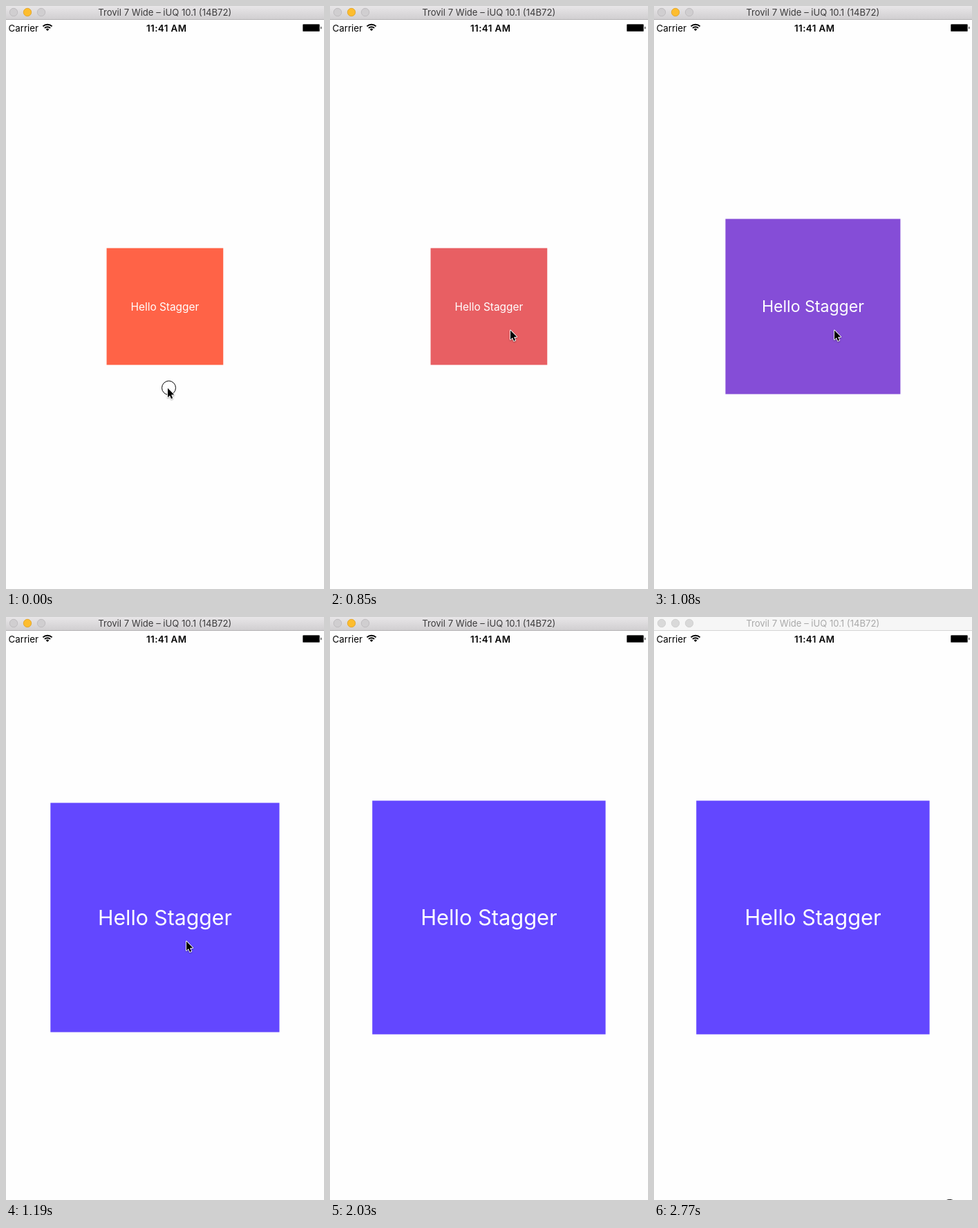
These frames come from a looping animation (460 px wide and 842 px high, 2.87 s). An HTML page with a canvas:

```html
<!DOCTYPE html>
<html lang="en">
<head>
<meta charset="utf-8">
<title>Hello Stagger</title>
<style>
  html, body { margin: 0; width: 100%; height: 100%; overflow: hidden; background: #fefefe; }
  canvas { display: block; width: 460px; height: 842px; }
</style>
</head>
<body>
<canvas id="stage"></canvas>
<script>
const W = 460, H = 842, LOOP = 2870;
const canvas = document.getElementById('stage');
const ctx = canvas.getContext('2d');
const dpr = window.devicePixelRatio || 1;
canvas.width = W * dpr;
canvas.height = H * dpr;

const FONT = 'Inter, "Open Sans", sans-serif';
const FROM = [255, 99, 71], TO = [99, 71, 255];
const START = [233.5, 551], REST = [260.5, 467.5], EXIT = [409.5, 819];

// The pointer rises past its resting place and settles back
const RISE = [[235, 547], [243, 525], [252, 495], [258, 471], [261, 460], [262, 457.5], [261.5, 462], REST];
// Eased growth of the box, one value per tick
const GROW = [0, 0.004, 0.041, 0.235, 0.5, 0.78, 0.963, 1];
const ARROW = [[0.5, 1], [0.5, 14.2], [3.5, 11.4], [5.5, 16.2], [7.6, 15.3], [5.6, 10.6], [9.7, 10.3]];

const mix = (a, b, p) => a + (b - a) * p;
const clamp = p => Math.min(1, Math.max(0, p));

// Index of the current tick among n evenly spaced between a and b; -1 before a
function tick(t, a, b, n) {
  if (t < a) return -1;
  return Math.min(n - 1, Math.floor((t - a) * (n - 1) / (b - a) + 0.13));
}

function disc(x, y, r, fill, line) {
  ctx.beginPath();
  ctx.arc(x, y, r, 0, Math.PI * 2);
  ctx.fillStyle = fill;
  ctx.fill();
  ctx.strokeStyle = line;
  ctx.lineWidth = 0.8;
  ctx.stroke();
}

function label(str, x, y, size, color, align = 'center', weight = 400, spacing = 0) {
  ctx.font = `${weight} ${size}px ${FONT}`;
  ctx.letterSpacing = `${spacing}px`;
  ctx.textAlign = align;
  ctx.fillStyle = color;
  ctx.fillText(str, x, y);
}

function titleBar(active) {
  const g = ctx.createLinearGradient(0, 0, 0, 19);
  g.addColorStop(0, active ? '#e8e6e8' : '#f6f6f6');
  g.addColorStop(1, active ? '#d1cfd1' : '#f6f6f6');
  ctx.fillStyle = g;
  ctx.fillRect(0, 0, W, 19);
  ctx.fillStyle = active ? '#b4b2b4' : '#d4d4d4';
  ctx.fillRect(0, 19, W, 1);
  const off = active ? ['#d0ced0', '#b9b7b9'] : ['#d9d9d9', '#cbcbcb'];
  disc(11, 9, 5.7, ...off);
  disc(31, 9, 5.7, ...(active ? ['#fdbd2e', '#dfa023'] : off));
  disc(51, 9, 5.7, ...off);
  label('Trovil 7 Wide – iUQ 10.1 (14B72)', 229.7, 14, 13.1, active ? '#3c3b3c' : '#a9a9a9');
}

function statusBar() {
  label('Carrier', 3.5, 36.5, 13.3, '#000', 'left');
  label('11:41 AM', 232.2, 36.5, 13.3, '#000', 'center', 600, 0.45);

  ctx.strokeStyle = '#000';
  ctx.lineWidth = 1.9;
  for (const r of [9.3, 5.8]) {
    ctx.beginPath();
    ctx.arc(60, 36, r, -Math.PI * 0.75, -Math.PI * 0.25);
    ctx.stroke();
  }
  ctx.fillStyle = '#000';
  ctx.beginPath();
  ctx.moveTo(60, 36);
  ctx.arc(60, 36, 3.2, -Math.PI * 0.75, -Math.PI * 0.25);
  ctx.fill();

  // Battery: soft rim around a full charge
  ctx.fillStyle = '#555';
  ctx.beginPath();
  ctx.roundRect(429, 26, 25, 11, 1.5);
  ctx.roundRect(455, 29.7, 1.5, 3.6, 0.7);
  ctx.fill();
  ctx.fillStyle = '#000';
  ctx.fillRect(430, 27, 23, 9);
}

function box(t) {
  const k = tick(t, 850, 1250, 8);
  const scale = 1 + (k < 0 ? 0 : GROW[k]);
  const shown = 850 + k * 400 / 7;
  const hue = k < 0 ? 0 : clamp((shown - 796) / 360);
  const rgb = FROM.map((v, i) => Math.round(mix(v, TO[i], hue)));
  ctx.save();
  ctx.translate(229.9, 434);
  ctx.scale(scale, scale);
  ctx.fillStyle = `rgb(${rgb})`;
  ctx.fillRect(-84.35, -84.35, 168.7, 168.7);
  label('Hello Stagger', 0, 5.6, 15.4, '#fff');
  ctx.restore();
}

function pointerAt(t) {
  if (t >= 2030) return null;
  if (t >= 1970) return [410.3, 832];
  const out = tick(t, 1430, 1910, 9);
  if (out >= 0) {
    const p = ((out + 1) / 9) ** 1.5;
    return REST.map((v, i) => mix(v, EXIT[i], p));
  }
  const rise = tick(t, 200, 610, 8);
  return rise < 0 ? START : RISE[rise];
}

function pointer([x, y]) {
  ctx.save();
  ctx.translate(x, y);
  ctx.beginPath();
  ARROW.forEach(p => ctx.lineTo(...p));
  ctx.closePath();
  ctx.lineJoin = 'round';
  ctx.lineWidth = 1.8;
  ctx.strokeStyle = '#fff';
  ctx.shadowColor = 'rgba(0,0,0,0.35)';
  ctx.shadowBlur = 2 * dpr;
  ctx.shadowOffsetY = dpr;
  ctx.stroke();
  ctx.shadowColor = 'transparent';
  ctx.fillStyle = '#000';
  ctx.fill();
  ctx.restore();
}

function ring(x, y) {
  ctx.beginPath();
  ctx.arc(x, y, 10, 0, Math.PI * 2);
  ctx.strokeStyle = '#000';
  ctx.lineWidth = 1;
  ctx.stroke();
}

function draw(t) {
  ctx.setTransform(dpr, 0, 0, dpr, 0, 0);
  ctx.fillStyle = '#fefefe';
  ctx.fillRect(0, 0, W, H);
  titleBar(t < 2260);
  statusBar();
  box(t);
  if (t < 50) ring(235.5, 551.5);
  if (t >= 730 && t < 850) ring(262.5, 468);
  if (t >= 2770) ring(427.7, 851.4);
  const at = pointerAt(t);
  if (at) pointer(at);
}

const began = performance.now();
function loop() {
  draw((performance.now() - began) % LOOP);
  requestAnimationFrame(loop);
}
loop();
</script>
</body>
</html>
```
